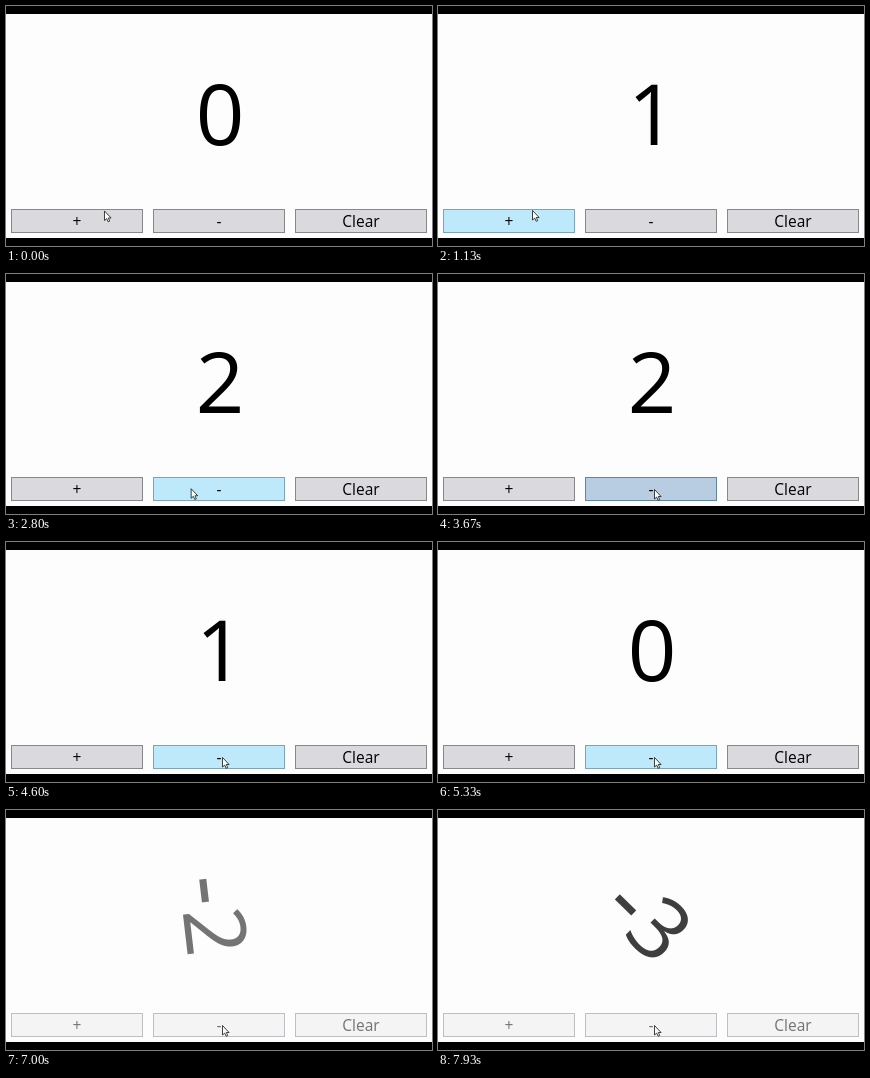
Write an HTML page that moves like this. It is 426 px wide and 240 px high and loops after 8000 ms.

```html
<!DOCTYPE html>
<html lang="en">
<head>
<meta charset="utf-8">
<title>Counter</title>
<style>
  html, body { margin: 0; width: 100%; height: 100%; overflow: hidden; background: #000; }
  svg { display: block; width: 100%; height: 100%; }
  text { font-family: "Open Sans", "Noto Sans", sans-serif; text-anchor: middle; }
  .button rect { fill: #dad9de; stroke: #888; }
  .button text { font-size: 15.5px; }
  .hover rect { fill: #bee9fa; stroke: #7aa5bd; }
  .pressed rect { fill: #b9cde2; stroke: #5f87a5; }
  .disabled rect { fill: #f4f4f4; stroke: #bcc0c3; }
  .disabled text { fill: #737373; }
</style>
</head>
<body>
<svg viewBox="0 0 426 240">
  <rect y="8" width="426" height="224" fill="#fdfdfd"/>
  <g id="number">
    <text id="sign" x="-23.5" y="38" font-size="96">-</text>
    <text id="digit" y="36" font-size="85">0</text>
  </g>
  <g class="button"><rect x="5.5" y="203.5" width="131" height="23"/><text x="71" y="221">+</text></g>
  <g class="button"><rect x="147.5" y="203.5" width="131" height="23"/><text x="213" y="221">-</text></g>
  <g class="button"><rect x="289.5" y="203.5" width="131" height="23"/><text x="355" y="221">Clear</text></g>
  <path id="cursor" d="M0 0V9.5L2.2 7.6L3.7 10.8L5.2 10.1L3.8 7H6.6Z" fill="#fff" stroke="#111" stroke-width=".8"/>
</svg>
<script>
const LOOP = 8000, SPIN = 600, PRESS = 55;
const PLUS = 0, MINUS = 1;
const clicks = [
  [330, PLUS], [1200, PLUS],
  [3720, MINUS], [4700, MINUS], [5680, MINUS], [6540, MINUS], [7405, MINUS]
];
// time, x, y of the pointer tip
const pointerPath = [
  [0, 98.5, 205], [250, 94.5, 204.5], [1200, 94.5, 204.5],
  [1750, 94.5, 212.5], [2400, 94.5, 212.5], [3000, 216.5, 215.5], [LOOP, 216.5, 215.5]
];
const byId = id => document.getElementById(id);
const buttons = [...document.querySelectorAll('.button')];

function pointerAt(t) {
  const i = pointerPath.findIndex(p => p[0] > t);
  const [t0, x0, y0] = pointerPath[i - 1], [t1, x1, y1] = pointerPath[i];
  const k = (t - t0) / (t1 - t0), ease = k * k * (3 - 2 * k);
  return [x0 + (x1 - x0) * ease, y0 + (y1 - y0) * ease];
}

function draw(t) {
  let value = 0, turn = 0, busy = false, pressed = -1;
  for (const [start, button] of clicks) {
    const k = (t - start) / SPIN;
    if (k >= 0.5) value += button === PLUS ? 1 : -1;
    if (k >= 0 && k < 1) {
      busy = true;
      turn = 1 - Math.abs(2 * k - 1);
    }
    if (t >= start - PRESS && t < start) pressed = button;
  }

  // The old value turns and fades away, then the new one turns back.
  byId('number').setAttribute('transform', `translate(213 102.5) rotate(${180 * turn})`);
  byId('number').setAttribute('opacity', 1 - turn);
  byId('sign').setAttribute('visibility', value < 0 ? 'visible' : 'hidden');
  byId('digit').setAttribute('x', value < 0 ? 18 : 1);
  byId('digit').textContent = Math.abs(value);

  const [x, y] = pointerAt(t);
  byId('cursor').setAttribute('transform', `translate(${x} ${y})`);
  buttons.forEach((button, i) => {
    const over = t >= 70 && x > 5 + 142 * i && x < 137 + 142 * i;
    const state = busy ? 'disabled' : pressed === i ? 'pressed' : over ? 'hover' : '';
    button.setAttribute('class', 'button ' + state);
  });
}

function frame() {
  draw(performance.now() % LOOP);
  requestAnimationFrame(frame);
}
frame();
</script>
</body>
</html>
```
